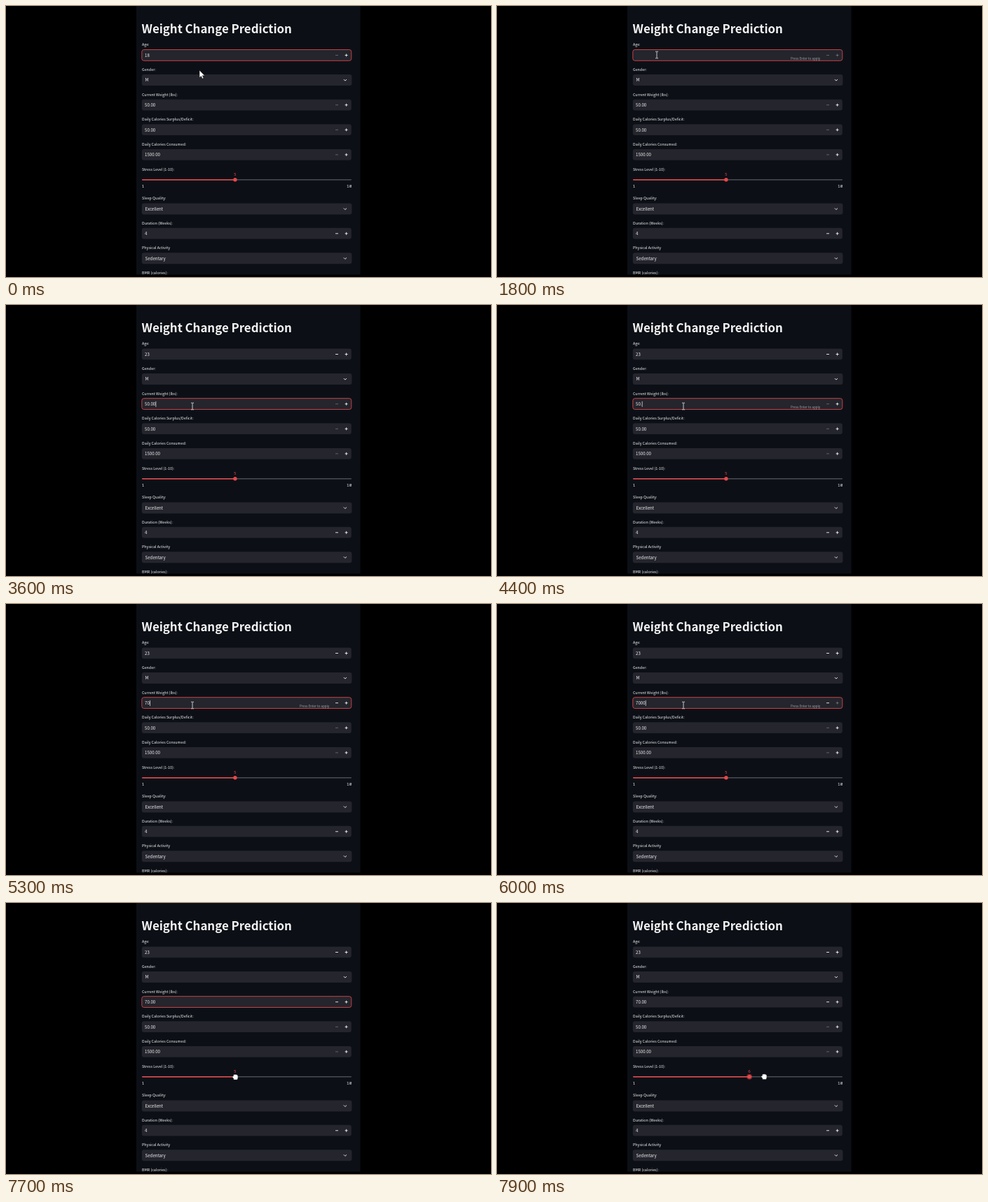
Animation of 692x388 px, one loop 8000 ms. Source, as an HTML page:

```html
<!DOCTYPE html>
<html lang="en">
<head>
<meta charset="utf-8">
<title>Weight form</title>
<style>
html, body { margin: 0; width: 100%; height: 100%; overflow: hidden; background: #000; }
svg { display: block; width: 100%; height: 100%; }
text { font-family: "Noto Sans CJK JP", "Noto Sans CJK SC", "Noto Sans", sans-serif; fill: #f4f4f5; white-space: pre; }
.title { font-size: 16.85px; font-weight: 700; }
.label { font-size: 5.34px; }
.value { font-size: 6.1px; }
.hint { font-size: 4.57px; fill: #a3a4a9; }
.tick { font: 6px "Noto Sans Mono", monospace; }
.box { fill: #24252d; }
.line { fill: none; stroke: #f4f4f5; stroke-width: 0.9; }
</style>
</head>
<body>
<svg id="stage" viewBox="0 0 692 388"></svg>
<script>
const LOOP = 8000;
const RED = '#e8474b';
const LEFT = 194, RIGHT = 493;
const stage = document.getElementById('stage');

function add(tag, attrs, text, parent = stage) {
  const el = document.createElementNS('http://www.w3.org/2000/svg', tag);
  set(el, attrs);
  if (text) el.textContent = text;
  parent.appendChild(el);
  return el;
}

function set(el, attrs) {
  for (const k in attrs) el.setAttribute(k, attrs[k]);
}

const show = (el, on) => el.setAttribute('visibility', on ? 'visible' : 'hidden');
const label = (y, text) => add('text', { class: 'label', x: LEFT, y: y + 2.2 }, text);

function numberField(y, name, value, canDrop = false) {
  label(y - 15.4, name);
  const box = add('rect', { class: 'box', x: 193.8, y: y - 8, width: 299, height: 15.8, rx: 3 });
  const text = add('text', { class: 'value', x: 198, y: y + 2.2 }, value);
  const minus = add('path', { class: 'line', d: `M470 ${y}h4` });
  const plus = add('path', { class: 'line', d: `M483.6 ${y}h4m-2 -2v4` });
  const hint = add('text', { class: 'hint', x: 419, y: y + 6.4 }, 'Press Enter to apply');
  const caret = add('rect', { y: y - 3.8, width: 0.7, height: 8, fill: '#f4f4f5' });
  const light = (el, on) => el.setAttribute('stroke-opacity', on ? 1 : 0.33);

  function update(s) {
    text.textContent = s.text;
    set(box, s.focus
      ? { stroke: '#c64044', 'stroke-width': 1 }
      : { stroke: 'none' });
    light(minus, s.minus);
    light(plus, s.plus);
    show(hint, s.hint);
    show(caret, s.caret);
    if (s.caret) caret.setAttribute('x', 198.3 + (s.text ? text.getComputedTextLength() : 0));
  }
  update({ text: value, minus: canDrop, plus: true });
  return update;
}

function selectField(y, name, value) {
  label(y - 15.4, name);
  add('rect', { class: 'box', x: 193.8, y: y - 8, width: 299.6, height: 16, rx: 3 });
  add('text', { class: 'value', x: 198.6, y: y + 2.2 }, value);
  add('path', { class: 'line', d: `M481.8 ${y - 1}l2.1 2.1l2.1 -2.1` });
}

add('rect', { width: 692, height: 388, fill: '#000' });
add('rect', { x: 186, width: 319.5, height: 384.5, fill: '#0c1016' });
add('text', { class: 'title', x: 193.5, y: 38.8 }, 'Weight Change Prediction');
const age = numberField(70.5, 'Age:', '18');
selectField(106, 'Gender:', 'M');
const weight = numberField(141.7, 'Current Weight (lbs):', '50.00');
numberField(177.3, 'Daily Calories Surplus/Deficit:', '50.00');
numberField(212.9, 'Daily Calories Consumed:', '1500.00');

label(233.3, 'Stress Level (1-10):');
add('rect', { x: LEFT, y: 247.9, width: RIGHT - LEFT, height: 1.7, rx: 0.8, fill: '#4b4c53' });
const fill = add('rect', { x: LEFT, y: 247.9, height: 1.7, rx: 0.8, fill: RED });
const halo = add('circle', { cy: 248.8, r: 4, fill: RED, opacity: 0.45 });
const thumb = add('circle', { cy: 248.8, r: 2.7, fill: RED });
const level = add('text', { class: 'tick', y: 243.2, 'text-anchor': 'middle', style: 'fill:#d8454a' });
add('text', { class: 'tick', x: 193.7, y: 260.2 }, '1');
add('text', { class: 'tick', x: RIGHT + 0.3, y: 260.2, 'text-anchor': 'end' }, '10');

selectField(290.5, 'Sleep Quality:', 'Excellent');
numberField(325.8, 'Duration (Weeks):', '4', true);
selectField(361.3, 'Physical Activity', 'Sedentary');
label(381.3, 'BMR (calories):');

const pointer = add('g', {});
const shapes = {
  arrow: add('path', {
    d: 'M0 0V10.6L2.4 8.4L4.1 12L5.9 11.2L4.3 7.7H7.6Z',
    fill: '#fff', stroke: '#111', 'stroke-width': 0.5
  }, '', pointer),
  beam: add('path', {
    d: 'M-2 -4.8H-.6L0 -4.3L.6 -4.8H2M0 -4.3V4.3M-2 4.8H-.6L0 4.3L.6 4.8H2',
    fill: 'none', stroke: '#dcdcde', 'stroke-width': 0.9
  }, '', pointer),
  hand: add('path', {
    d: 'M-2.2 4V2.6L-4 .2Q-4 -1.4 -2.5 -1V-2.6Q-1.8 -3.8 -.9 -3.2Q0 -4.4 1 -3.3Q2 -3.8 2.6 -2.7Q4 -2.8 3.9 -1V1.4L3 4Z',
    fill: '#fff', stroke: '#222', 'stroke-width': 0.4
  }, '', pointer)
};

// time, x, y
const path = [
  [0, 276, 92], [300, 228, 70], [2600, 228, 70], [2700, 265, 98], [2800, 265, 98],
  [3000, 266, 111], [3100, 266, 122], [3200, 266, 122], [3300, 268, 137],
  [3400, 268, 137], [3500, 266, 145], [7000, 266, 145], [7100, 269, 148],
  [7200, 269, 148], [7300, 277, 273], [7700, 327, 249], [7800, 327, 249], [7900, 381, 248.5]
];

// time, text, caret, minus lit, plus lit, hint
const ageKeys = [
  [0, '18', 0, 0, 1, 0], [1800, '', 0, 0, 0, 1], [2500, '2', 1, 1, 1, 1],
  [2700, '23', 1, 1, 1, 1], [3300, '23', 0, 1, 1, 1], [3500, '23', 0, 1, 1, 0]
];
const weightKeys = [
  [0, '50.00', 0, 0, 1, 0], [3500, '50.00', 1, 0, 1, 0], [3800, '50.00', 0, 0, 1, 0],
  [4200, '50.00', 1, 0, 1, 0], [4400, '50.', 1, 0, 1, 1], [4500, '50', 1, 0, 1, 1],
  [4600, '5', 1, 0, 0, 1], [4700, '', 1, 0, 0, 1], [5000, '7', 1, 0, 0, 1],
  [5300, '70', 1, 1, 1, 1], [5500, '700', 1, 1, 0, 1], [5800, '7000', 1, 1, 0, 1],
  [6200, '700', 1, 1, 0, 1], [6600, '70', 1, 1, 1, 1], [7100, '70', 0, 1, 1, 1],
  [7600, '70.00', 0, 1, 1, 0]
];

function stateAt(keys, t, focus) {
  const [, text, caret, minus, plus, hint] = keys.filter(k => k[0] <= t).pop();
  return { text, caret, minus, plus, hint, focus };
}

function pointAt(t) {
  const i = path.findIndex(k => k[0] > t);
  if (i < 0) return path[path.length - 1].slice(1);
  const a = path[i - 1], b = path[i];
  const p = (t - a[0]) / (b[0] - a[0]);
  return [a[1] + (b[1] - a[1]) * p, a[2] + (b[2] - a[2]) * p];
}

function cursorKind(x, y) {
  if (x > 320 && Math.abs(y - 249) < 5) return 'hand';
  return [70.5, 106, 142].some(c => Math.abs(y - c) < 8.2) ? 'beam' : 'arrow';
}

function draw(time) {
  const t = Math.floor((time % LOOP) / 100) * 100;
  age(stateAt(ageKeys, t, t < 3500));
  weight(stateAt(weightKeys, t, t >= 3500 && t < 7900));

  const stress = t < 7900 ? 5 : 6;
  const x = LEFT + (RIGHT - LEFT) * (stress - 1) / 9;
  fill.setAttribute('width', x - LEFT);
  thumb.setAttribute('cx', x);
  halo.setAttribute('cx', x);
  show(halo, stress === 6);
  level.setAttribute('x', x);
  level.textContent = stress;

  const [px, py] = pointAt(t);
  const kind = cursorKind(px, py);
  pointer.setAttribute('transform', `translate(${px} ${py})`);
  for (const k in shapes) show(shapes[k], k === kind);
}

const start = performance.now();
function tick() {
  draw(performance.now() - start);
  requestAnimationFrame(tick);
}
tick();
</script>
</body>
</html>
```
